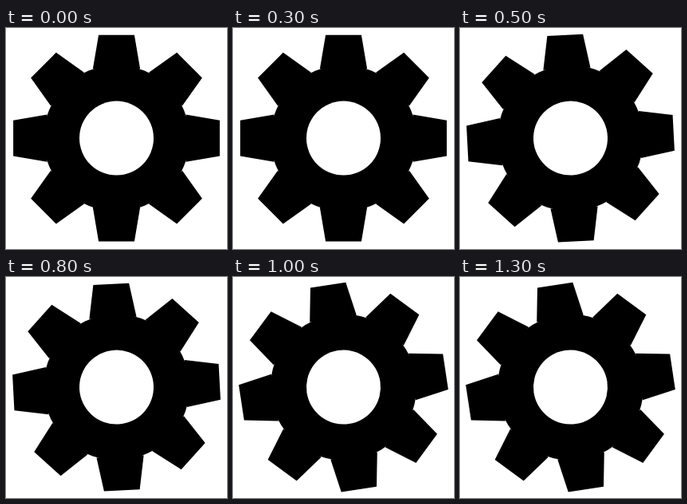
Animation, 277 px wide and 277 px high, one loop 1500 ms. Source, as an HTML page with a canvas:

```html
<!DOCTYPE html>
<html lang="en">
<head>
<meta charset="utf-8">
<title>Turning gear</title>
<style>
html, body { margin: 0; width: 100%; height: 100%; overflow: hidden; background: #fff; }
canvas { display: block; }
</style>
</head>
<body>
<canvas id="stage" width="277" height="277"></canvas>
<script>
const ctx = document.getElementById('stage').getContext('2d');
const SIZE = 277;
const STEP_MS = 500;
const ANGLES = [0, -3, -8.6]; // degrees, held for one step each
const TEETH = 8;
const BODY_RADIUS = 91.5;
const HOLE_RADIUS = 46.5;
const TOOTH = { tip: 129.4, tipHalf: 22.4, base: 87, baseHalf: 29.6 };

function disc(radius, color) {
  ctx.fillStyle = color;
  ctx.beginPath();
  ctx.arc(0, 0, radius, 0, Math.PI * 2);
  ctx.fill();
}

function tooth() {
  const { tip, tipHalf, base, baseHalf } = TOOTH;
  ctx.beginPath();
  ctx.moveTo(-baseHalf, -base);
  ctx.lineTo(-tipHalf, -tip);
  ctx.lineTo(tipHalf, -tip);
  ctx.lineTo(baseHalf, -base);
  ctx.fill();
}

function drawGear(degrees) {
  ctx.fillStyle = '#fff';
  ctx.fillRect(0, 0, SIZE, SIZE);
  ctx.save();
  ctx.translate(138.5, 138.1);
  ctx.rotate(degrees * Math.PI / 180);
  disc(BODY_RADIUS, '#000');
  for (let i = 0; i < TEETH; i++) {
    tooth();
    ctx.rotate(Math.PI * 2 / TEETH);
  }
  disc(HOLE_RADIUS, '#fff');
  ctx.restore();
}

let start;
function tick(now) {
  start ??= now;
  const step = Math.floor((now - start) / STEP_MS) % ANGLES.length;
  drawGear(ANGLES[step]);
  requestAnimationFrame(tick);
}

drawGear(ANGLES[0]);
requestAnimationFrame(tick);
</script>
</body>
</html>
```
